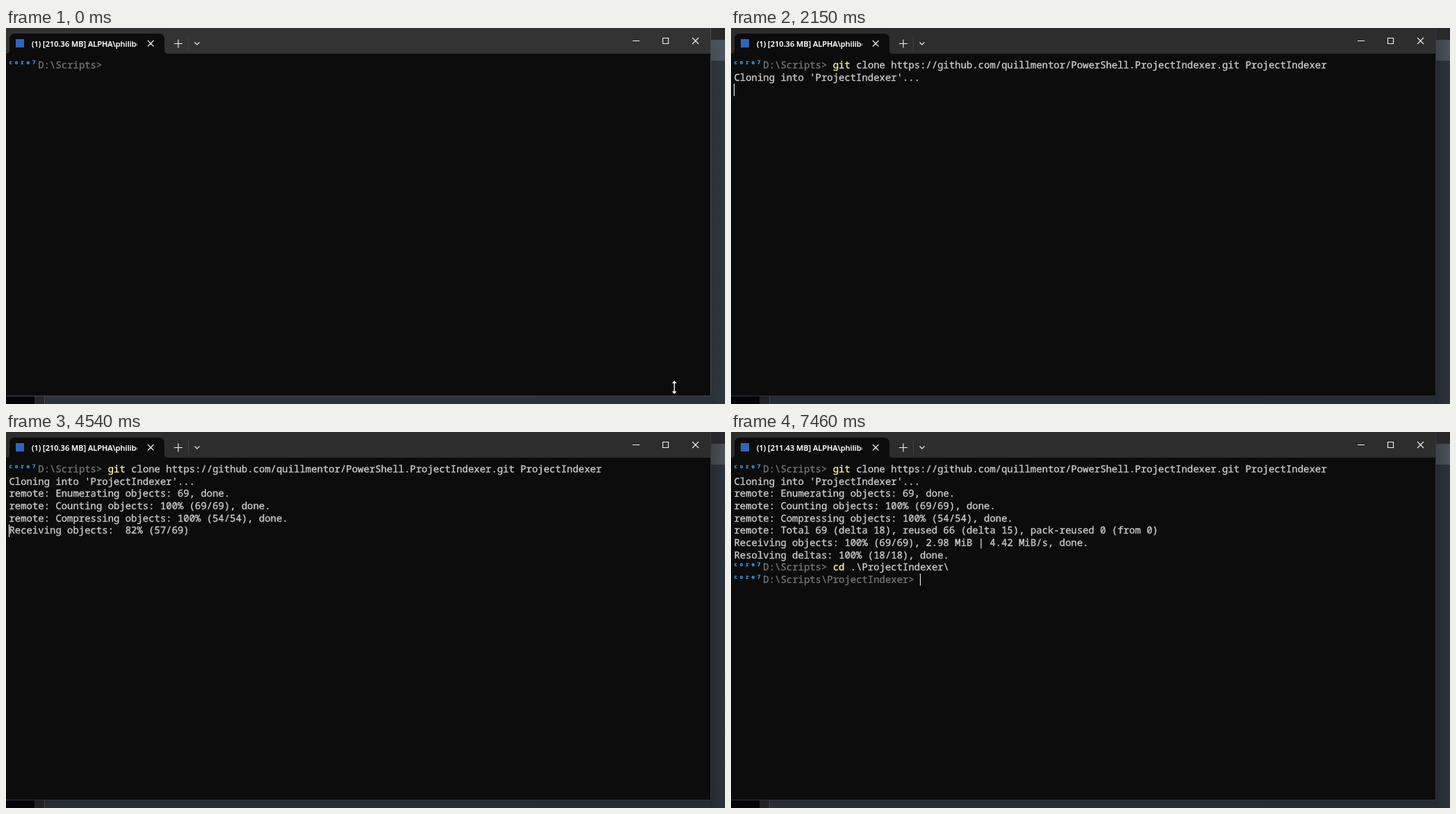
Recreate the animation shown at these times as an HTML page. Size 1035x541 px, loop 8000 ms.

```html
<!DOCTYPE html>
<html lang="en">
<head>
<meta charset="utf-8">
<title>Terminal session</title>
<style>
html, body { margin: 0; width: 100%; height: 100%; overflow: hidden; background: #2f3741; }
svg { position: absolute; left: 0; top: 0; }
.row, #tab, #caret { position: absolute; }
.row {
  left: 4.5px; height: 17.65px; white-space: pre; color: #ccc;
  font: 500 13.95px/17.65px "Noto Sans Mono", "DejaVu Sans Mono", monospace;
  text-rendering: geometricPrecision; font-variant-ligatures: none; -webkit-text-stroke: .35px;
}
.row b { font-weight: inherit; color: #f9f1a5; }
.row u { text-decoration: none; color: #767676; }
.row em { color: #7d7d7d; }
.row i {
  display: inline-block; width: 41.85px; line-height: 0; font-size: 7.5px; font-style: normal; font-weight: 700;
  letter-spacing: 3.87px; position: relative; top: -6px; color: #3a96dd;
}
#tab {
  left: 37px; top: 14px; width: 152px; height: 18px; overflow: hidden; white-space: pre; color: #fff;
  font: 600 11px/18px "Open Sans", "Noto Sans", sans-serif; -webkit-text-stroke: .2px;
}
#caret { width: 1px; height: 17.65px; background: #fff; }
</style>
</head>
<body>
<svg width="1035" height="541" fill="none">
  <linearGradient id="side"><stop/><stop offset="1" stop-opacity=".2"/></linearGradient>
  <linearGradient id="under" x2="0" y2="1"><stop/><stop offset="1" stop-opacity=".6"/></linearGradient>
  <path d="M1014 0h21v17h-21z" fill="#29292b"/>
  <path d="M1014 17h21v30h-21z" fill="#50565f"/>
  <path d="M0 529h41v12h-41z" fill="#04050b"/>
  <path d="M41 529h14v12h-14z" fill="#2a2a2c"/>
  <path d="M55.5 529v12" stroke="#50555c"/>
  <g id="shadow">
    <path d="M1014 17h21v524h-21z" fill="url(#side)"/>
    <path d="M0 529h1014v12h-1014z" fill="url(#under)"/>
  </g>
  <path d="M0 0h1014v529h-1014z" fill="#0c0c0c"/>
  <path id="bar" d="M0 0h1014v37h-1014z"/>
  <path id="edge" d="M0 529.5h1014.5V0"/>
  <path d="M0 37q5 0 5-5V16q0-8 8-8h207q8 0 8 8v16q0 5 5 5z" fill="#0c0c0c"/>
  <path d="M14 16h12v12h-12z" fill="#2f66b8"/>
  <path d="M262.5 12v21" stroke="#404040"/>
  <path d="M204 18l8.500 8.500m0-8.500l-8.500 8.500M242 22.500h12m-6-6v12M271.500 20.500l3.500 3.500 3.500-3.500M902 18.500h10M945.500 14.500h8v8h-8zM988 14l9 9m0-9l-9 9" stroke="#f4f4f4" stroke-width="1.100"/>
</svg>
<div id="tab"></div>
<div id="caret"></div>
<svg width="1035" height="541">
  <g id="mouse" fill="#fff" stroke="#000" stroke-width=".6">
    <path id="arrow" d="M0 0v14.200l3.300-3 2.300 5.200 2.300-1-2.300-5h4.400z"/>
    <path id="resize" d="M0-10l4 4.500h-3v11h3l-4 4.500-4-4.500h3v-11h-3z"/>
  </g>
</svg>
<script>
const LOOP = 8000, CELL = 8.37, LINE = 17.65, LEFT = 4.5, TOP = 45;
const $ = id => document.getElementById(id);
const clamp = x => Math.min(1, Math.max(0, x));
const ease = x => x * x * (3 - 2 * x);
const mix = (a, b, k) => a + (b - a) * k;
// Last entry of a time-ordered list that has started
const at = (list, t) => list.filter(e => e[0] <= t).pop();

const prompt = dir => `<i>core7</i><u>D:\\${dir}></u> `;
const home = prompt('Scripts');
const clone = 'git clone https://github.com/quillmentor/PowerShell.ProjectIndexer.git ProjectIndexer';
const progress = (label, n, total) =>
  `${label} objects: ${String(Math.floor(100 * n / total)).padStart(3)}% (${n}/${total})`;
const paint = s => s.replace(/^\S+/, '<b>$&</b>');
const cd = (typed, ghost = '') => home + paint(typed) + `<em>${ghost}</em>`;
const pasted = t => Math.round(clone.length * clamp((t - 790) / 140));
const received = t => Math.floor(mix(11, 69, clamp((t - 4220) / 400)));

const rows = [
  [[0, t => home + paint(clone.slice(0, pasted(t)))]],
  [[2150, "Cloning into 'ProjectIndexer'..."]],
  [[3820, 'remote: Enumerating objects: 69, done.']],
  [[3820, 'remote: ' + progress('Counting', 69, 69) + ', done.']],
  [[3840, 'remote: ' + progress('Compressing', 8, 54)],
   [3880, 'remote: ' + progress('Compressing', 54, 54) + ', done.']],
  [[4020, progress('Receiving', 1, 69)],
   [4040, t => progress('Receiving', received(t), 69)],
   [4640, 'remote: Total 69 (delta 18), reused 66 (delta 15), pack-reused 0 (from 0)']],
  [[4640, progress('Receiving', 69, 69) + ', 2.98 MiB | 4.42 MiB/s, done.']],
  [[4700, t => {
    const n = Math.floor(18 * clamp((t - 4700) / 90));
    return `Resolving deltas: ${String(Math.floor(100 * n / 18)).padStart(3)}% (${n}/18)${n == 18 ? ', done.' : ''}`;
  }]],
  [[5000, home],
   [5660, cd('c', 'd D:\\Scripts')],
   [5740, cd('cd', ' D:\\Scripts')],
   [5880, cd('cd ', 'D:\\Scripts')],
   [6160, cd('cd P', 'owerShell.ProjectIndexer')],
   [6360, cd('cd Pr')],
   [6440, cd('cd Pro')],
   [6620, cd('cd .\\ProjectIndexer\\')]],
  [[7460, prompt('Scripts\\ProjectIndexer')]]
];

// time, row, column; no row means hidden
const carets = [
  [0], [770, 0, 17], [1320], [1850, 0, 102], [1990, 1, 0], [2150, 2, 0], [2660], [3190, 2, 0], [3720],
  [3820, 4, 0], [3880, 5, 0], [4640, 6, 0], [4700, 7, 0], [4800, 8, 0], [5000, 8, 17], [5330],
  [5660, 8, 18], [5740, 8, 19], [5880, 8, 20], [6160, 8, 21], [6360, 8, 22], [6440, 8, 23],
  [6620, 8, 37], [7320, 9, 0], [7460, 9, 32]
];
const memory = [[0, '210.36'], [5000, '210.99'], [7460, '211.43']];

const lines = rows.map((_, i) => {
  const el = document.createElement('div');
  el.className = 'row';
  el.style.top = TOP + i * LINE + 'px';
  return document.body.insertBefore(el, $('caret'));
});

function setHtml(el, html) {
  if (el.shown !== html) el.innerHTML = el.shown = html;
}

function drawMouse(t) {
  const sweep = ease(clamp((t - 20) / 400)), settle = ease(clamp((t - 420) / 90));
  const x = mix(mix(962, 380, sweep), 393.5, settle);
  const y = mix(mix(517, 280, sweep), 267.5, settle);
  $('mouse').setAttribute('transform', `translate(${x} ${y})`);
  $('mouse').style.display = t < 1990 ? '' : 'none';
  $('resize').style.display = t < 40 ? '' : 'none';
  $('arrow').style.display = t < 40 ? 'none' : '';
}

function draw(now) {
  const t = now % LOOP, focused = t >= 770;
  rows.forEach((states, i) => {
    const text = (at(states, t) || [0, ''])[1];
    setHtml(lines[i], typeof text == 'function' ? text(t) : text);
  });
  const [, row, col] = at(carets, t);
  const shift = t < 1320 ? pasted(t) : 0;
  const caret = $('caret').style;
  caret.display = row === undefined ? 'none' : '';
  caret.left = Math.floor(LEFT + (col + shift) * CELL) + 'px';
  caret.top = TOP + row * LINE + 'px';
  setHtml($('tab'), `(1) [${at(memory, t)[1]} MB] ALPHA\\philibert`);
  $('bar').setAttribute('fill', focused ? '#2d2d2d' : '#333');
  $('edge').setAttribute('stroke', focused ? '#34373a' : '#4a4d50');
  $('shadow').setAttribute('opacity', focused ? 0.25 : 0.1);
  drawMouse(t);
  requestAnimationFrame(draw);
}
requestAnimationFrame(draw);
</script>
</body>
</html>
```
